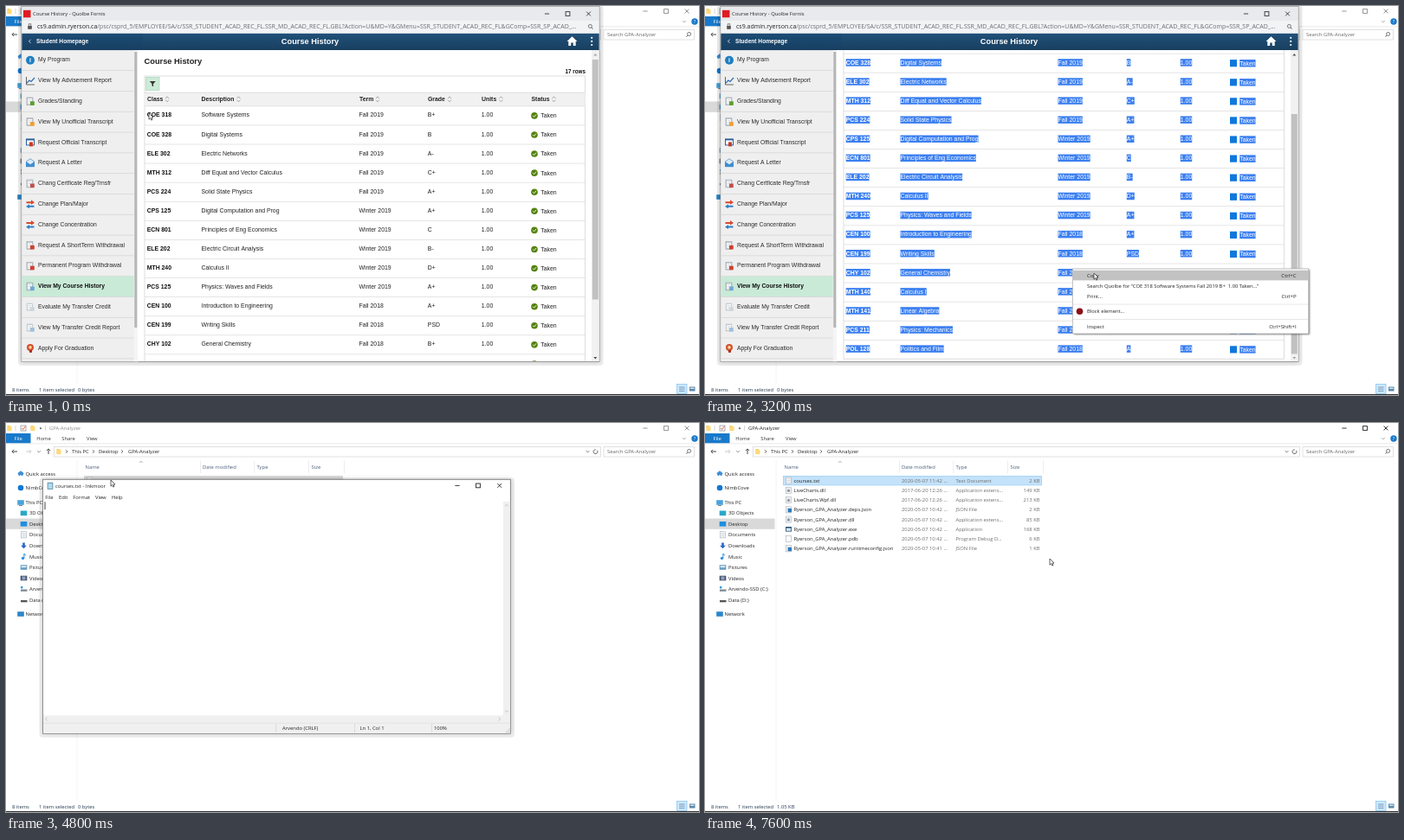
Write an HTML page with a canvas that moves like this. It is 800 px wide and 450 px high and loops after 7700 ms.

```html
<!DOCTYPE html>
<html lang="en">
<head>
<meta charset="utf-8">
<title>Course History</title>
<style>
html, body { margin: 0; width: 100%; height: 100%; overflow: hidden; background: #fff; }
canvas { display: block; width: 800px; height: 450px; }
</style>
</head>
<body>
<canvas id="stage"></canvas>
<script>
const LOOP = 7700, STEP = 100;
const canvas = document.getElementById('stage');
const c = canvas.getContext('2d');
const dpr = window.devicePixelRatio || 1;
canvas.width = 800 * dpr;
canvas.height = 450 * dpr;

const UI = '"Open Sans", "Noto Sans", sans-serif';
const ARIAL = '"Liberation Sans", Arial, sans-serif';
const MONO = '"Noto Sans Mono", monospace';

// --- drawing helpers ---
function text(s, x, y, size, color, family, align = 'left', weight = 400) {
  c.font = `${weight} ${size}px ${family}`;
  c.fillStyle = color;
  c.textAlign = align;
  c.fillText(s, x, y + size * 0.36);
}
const ui = (s, x, y, color = '#222', align = 'left', size = 5.85) => text(s, x, y, size, color, UI, align);
const arial = (s, x, y, color = '#222', weight = 400, size = 6.9, align = 'left') =>
  text(s, x, y, size, color, ARIAL, align, weight);

function rect(x, y, w, h, color) {
  c.fillStyle = color;
  c.fillRect(x, y, w, h);
}
function frame(x, y, w, h, color, lw = 1) {
  c.strokeStyle = color;
  c.lineWidth = lw;
  c.strokeRect(x, y, w, h);
}
function disc(x, y, r, color) {
  c.fillStyle = color;
  c.beginPath();
  c.arc(x, y, r, 0, 7);
  c.fill();
}
function path(points, color, lw = 0.8, fill) {
  c.beginPath();
  for (let i = 0; i < points.length; i += 2) c.lineTo(points[i], points[i + 1]);
  if (fill) {
    c.closePath();
    c.fillStyle = fill;
    c.fill();
  }
  if (color) {
    c.strokeStyle = color;
    c.lineWidth = lw;
    c.stroke();
  }
}
function chevron(x, y, dir, color = '#555', r = 1.8) {
  const [dx, dy] = { r: [1, 0], l: [-1, 0], u: [0, -1], d: [0, 1] }[dir];
  path([x - dx * r / 2 + dy * r, y - dy * r / 2 + dx * r, x + dx * r / 2, y + dy * r / 2,
    x - dx * r / 2 - dy * r, y - dy * r / 2 - dx * r], color, 0.8);
}
function shadowed(x, y, w, h, fill, blur, offset, alpha) {
  c.save();
  c.shadowColor = `rgba(0,0,0,${alpha})`;
  c.shadowBlur = blur * dpr;
  c.shadowOffsetX = c.shadowOffsetY = offset * dpr;
  rect(x, y, w, h, fill);
  c.restore();
}
function windowPanel(x, y, w, h, border) {
  c.fillStyle = 'rgba(0,0,0,.07)';
  c.beginPath();
  c.roundRect(x - 4, y - 2, w + 8.5, h + 6.5, 4);
  c.fill();
  shadowed(x, y, w, h, '#fff', 5, 0, 0.22);
  frame(x, y, w, h, border, 0.8);
}
function menuPanel(x, y, w, h, fill) {
  shadowed(x, y, w, h, fill, 2, 1.2, 0.5);
  frame(x, y, w, h, '#a8a8a8', 0.7);
}
function controls(xs, y, color, closeColor = color) {
  path([xs[0] - 2.6, y, xs[0] + 2.6, y], color, 0.9);
  frame(xs[1] - 2.4, y - 2.4, 4.8, 4.8, color, 0.9);
  path([xs[2] - 2.4, y - 2.4, xs[2] + 2.4, y + 2.4], closeColor, 0.9);
  path([xs[2] + 2.4, y - 2.4, xs[2] - 2.4, y + 2.4], closeColor, 0.9);
}
function folder(x, y) {
  rect(x - 2.5, y - 3, 3, 6, '#f3c34f');
  rect(x - 2, y - 2.2, 4.5, 5.4, '#ffd978');
}
function sheet(x, y, badge, lines = '#9aa7b4') {
  rect(x - 3, y - 3.6, 6, 7.2, '#fff');
  frame(x - 3, y - 3.6, 6, 7.2, '#a3acb5', 0.6);
  for (let i = 0; i < 3; i++) path([x - 2, y - 1.8 + i * 1.8, x + 2, y - 1.8 + i * 1.8], lines, 0.5);
  if (badge) rect(x, y + 0.4, 3.8, 3.4, badge);
}
function lens(x, y, side = 1) {
  c.strokeStyle = '#555';
  c.lineWidth = 0.8;
  c.beginPath();
  c.arc(x + 0.6 * side, y - 0.6, 2, 0, 7);
  c.stroke();
  path([x - 0.9 * side, y + 0.9, x - 2.6 * side, y + 2.6], '#555', 0.9);
}

// --- timing ---
const smooth = p => p * p * (3 - 2 * p);
const span = (t, a, b) => smooth(Math.min(1, Math.max(0, (t - a) / (b - a))));
const POINTER = [
  [0, 165, 124], [200, 165, 126], [900, 614, 390], [1100, 633, 400], [1600, 632, 397],
  [2200, 424, 304], [2400, 424, 304], [2500, 431, 309], [2600, 431, 309], [2800, 449, 309],
  [3200, 449, 309], [3600, 733, 249], [3700, 733, 249], [4200, 125, 76], [4500, 121, 66],
  [4800, 121, 66], [5100, 160, 153], [5200, 160, 153], [5500, 190, 192], [5700, 190, 192],
  [6500, 546, 75], [6700, 564, 69], [7100, 564, 69], [7600, 398, 157]
];
function pointerAt(t) {
  for (let i = 1; i < POINTER.length; i++) {
    const [a, x, y] = POINTER[i - 1], [b, u, v] = POINTER[i];
    if (t <= b) {
      const p = span(t, a, b);
      return [x + (u - x) * p, y + (v - y) * p];
    }
  }
  return POINTER[POINTER.length - 1].slice(1);
}
function pointer(x, y) {
  path([x, y, x, y + 7.2, x + 1.7, y + 5.7, x + 2.8, y + 8.1, x + 4, y + 7.5, x + 2.9, y + 5.2, x + 5, y + 5, x, y],
    '#222', 0.7, '#fff');
}

// --- file manager ---
const PLACES = [
  ['Quick access', 58.5, '#3d8fd8', 0], ['NimbCove', 75, '#0f78d4', 0], ['This PC', 92, '#4aa3dc', 0],
  ['3D Objects', 104.3, '#2aa7c9', 1], ['Desktop', 116.8, '#1f8fe0', 1], ['Documents', 129.3, '#8fa3b5', 1],
  ['Downloads', 141.8, '#2a66c8', 1], ['Music', 154.4, '#2f8fe0', 1], ['Pictures', 167, '#6a9cc0', 1],
  ['Videos', 179.5, '#4b5563', 1], ['Arvendo-SSD (C:)', 192, '#7d8a96', 1], ['Data (D:)', 204.5, '#555', 1],
  ['Network', 221, '#2d86c9', 0]
];
const DLL = 'Application extens...';
const FILES = [
  ['courses.txt', '', 'Text Document', ''],
  ['LiveCharts.dll', '2017-06-20 12:26 ...', DLL, '149 KB'],
  ['LiveCharts.Wpf.dll', '2017-06-20 12:26 ...', DLL, '213 KB'],
  ['Ryerson_GPA_Analyzer.deps.json', '2020-05-07 10:42 ...', 'JSON File', '2 KB'],
  ['Ryerson_GPA_Analyzer.dll', '2020-05-07 10:42 ...', DLL, '85 KB'],
  ['Ryerson_GPA_Analyzer.exe', '2020-05-07 10:42 ...', 'Application', '168 KB'],
  ['Ryerson_GPA_Analyzer.pdb', '2020-05-07 10:42 ...', 'Program Debug D...', '6 KB'],
  ['Ryerson_GPA_Analyzer.runtimeconfig.json', '2020-05-07 10:41 ...', 'JSON File', '1 KB']
];

function placeIcon(i, x, y, color) {
  if (i === 1) return disc(x, y, 3.3, color);
  if (i === 0) return path([x - 3.5, y - 0.5, x, y - 3.2, x + 3.5, y - 0.5, x + 2, y + 3, x, y + 1.5, x - 2, y + 3], null, 0, color);
  if (i === 5) return sheet(x, y);
  if (i === 6) return path([x - 1.3, y - 3.4, x + 1.3, y - 3.4, x + 1.3, y, x + 3.4, y, x, y + 3.5, x - 3.4, y, x - 1.3, y], null, 0, color);
  if (i === 7) {
    disc(x - 1, y + 2, 1.7, color);
    return path([x + 0.4, y + 2, x + 0.4, y - 3.4, x + 2.4, y - 1], color, 1);
  }
  if (i === 10 || i === 11) {
    if (i === 10) rect(x - 3.5, y - 3, 2.4, 2.4, '#2a9be0');
    return rect(x - 3.5, y + 0.5, 7.5, 2.3, color);
  }
  rect(x - 3.8, y - 2.8, 7.6, 5.6, color);
  if (i === 2) rect(x - 2, y + 3, 4, 0.8, '#666');
  if (i === 8) rect(x - 2.8, y - 1.8, 5.6, 2, '#d8ecf8');
  if (i === 9) rect(x - 2, y - 2, 4, 4, '#8aa0c8');
}

function fileIcon(i, x, y) {
  if (i === 5) {
    rect(x - 3.4, y - 2.8, 6.8, 5.6, '#27506f');
    return rect(x - 2.6, y - 1.2, 5.2, 3.2, '#d7e9f5');
  }
  sheet(x, y, null, i === 6 ? '#fff' : '#9aa7b4');
  if (i === 3 || i === 7) rect(x - 0.8, y - 1.4, 4.4, 4.4, '#2b7cc0');
  if (i === 1 || i === 2 || i === 4) disc(x, y + 0.4, 1.6, '#8b98a5');
}

function explorer(t, mx, my) {
  const active = (t >= 3800 && t < 4800) || t >= 7200;
  const picked = t < 3800 || t >= 4600;
  const saved = t >= 7200;
  const ink = active ? '#222' : '#8a8a8a';
  rect(0, 0, 800, 450, '#fff');

  folder(4, 6);
  path([11, 3, 11, 9], '#bbb', 0.6);
  frame(17, 3, 6, 6, '#888', 0.7);
  path([18.2, 6, 19.6, 7.6, 22.4, 3.8], '#d2562b', 0.9);
  folder(31, 6);
  path([38.7, 5.6, 41.3, 5.6, 40, 7.4], null, 0, '#333');
  path([45.5, 3, 45.5, 9], '#bbb', 0.6);
  ui('GPA-Analyzer', 50, 6, ink);
  controls([738, 762, 786], 6, ink);

  rect(0, 12, 28.5, 11.5, '#1979ca');
  ui('File', 14.2, 18, '#fff', 'center');
  ui('Home', 43.5, 18, '#333', 'center');
  ui('Share', 72, 18, '#333', 'center');
  ui('View', 99.3, 18, '#333', 'center');
  chevron(783, 18, 'd', '#999');
  disc(795, 18, 3.7, '#1979ca');
  ui('?', 795, 18, '#fff', 'center', 5.5);
  rect(0, 23.5, 800, 0.7, '#e2e2e2');

  path([13, 33, 7, 33], '#333', 0.9);
  chevron(8, 33, 'l', '#333', 2.2);
  path([23, 33, 29, 33], '#c4c4c4', 0.9);
  chevron(28, 33, 'r', '#c4c4c4', 2.2);
  chevron(38, 33, 'd', '#777');
  path([49, 36, 49, 30], '#333', 0.9);
  chevron(49, 31, 'u', '#333', 2.2);
  frame(55.5, 27.5, 631, 11.5, '#d9d9d9', 0.8);
  folder(61, 33);
  [70, 101, 134].forEach(x => chevron(x, 33, 'r', '#444'));
  ui('This PC', 76, 33);
  ui('Desktop', 107, 33);
  ui('GPA-Analyzer', 141, 33);
  chevron(671.5, 33, 'd');
  c.beginPath();
  c.arc(680.5, 33.2, 2.4, -0.6, 4.8);
  c.strokeStyle = '#444';
  c.lineWidth = 0.8;
  c.stroke();
  frame(690, 27.5, 104.5, 11.5, '#d9d9d9', 0.8);
  ui('Search GPA-Analyzer', 694, 33, '#666');
  lens(788, 33);

  rect(0, 110.5, 80.5, 12.3, '#d9d9d9');
  PLACES.forEach(([label, y, color, sub], i) => {
    placeIcon(i, sub ? 20.5 : 17, y, color);
    ui(label, sub ? 27 : 22.5, y);
  });
  rect(81.7, 43, 0.7, 394, '#ededed');

  chevron(156, 45, 'u', '#888', 1.6);
  [['Name', 91.5], ['Date modified', 227], ['Type', 289.5], ['Size', 352.5]].forEach(([s, x]) => ui(s, x, 50.7, '#4c607a'));
  [224, 286.5, 349.3, 390].forEach(x => rect(x, 43.5, 0.7, 14.5, '#e5e5e5'));

  FILES.forEach((file, i) => {
    const y = 66.6 + i * 11.24, top = y - 5.6;
    const hover = active && mx > 90 && mx < 389 && my >= top && my < top + 11.24;
    if (i === 0 && picked) {
      rect(90, top, 299, 11.2, active ? '#c4e2fa' : '#d9d9d9');
      if (active) frame(90.3, top + 0.3, 298.4, 10.6, '#9ad0f7', 0.6);
    } else if (hover) {
      rect(90, top, 299, 11.2, '#e1f4fb');
    }
    if (i === 0 && !picked) frame(90.3, top + 0.3, 298.4, 10.6, '#cfeaf6', 0.6);
    fileIcon(i, 96.5, y);
    const date = file[1] || `2020-05-07 11:${saved ? 42 : 41} ...`;
    ui(file[0], 102.5, y);
    ui(date, 227, y, '#6d6d6d');
    ui(file[2], 289.5, y, '#6d6d6d');
    ui(file[3] || (saved ? '2 KB' : '0 KB'), 386.5, y, '#6d6d6d', 'right');
  });

  ui('8 items', 7, 443.5, '#24384f');
  if (picked) {
    ui('1 item selected', 38, 443.5, '#24384f');
    ui(saved ? '1.05 KB' : '0 bytes', 83, 443.5, '#24384f');
  }
  rect(774.5, 437.5, 11.5, 11, '#cce8ff');
  frame(774.5, 437.5, 11.5, 11, '#7fc1ee', 0.7);
  for (let i = 0; i < 3; i++) path([777, 441 + i * 2.2, 783.5, 441 + i * 2.2], '#5a7a94', 0.7);
  rect(789, 440.5, 6.5, 5, '#5b87a8');
  rect(790, 441.5, 4.5, 1.5, '#cfe6f5');
  rect(0, 449, 800, 1, '#333');
}

// --- browser ---
const MENU = ['My Program', 'View My Advisement Report', 'Grades/Standing', 'View My Unofficial Transcript',
  'Request Official Transcript', 'Request A Letter', 'Chang Certficate Reg/Trnsfr', 'Change Plan/Major',
  'Change Concentration', 'Request A ShortTerm Withdrawal', 'Permanent Program Withdrawal',
  'View My Course History', 'Evaluate My Transfer Credit', 'View My Transfer Credit Report', 'Apply For Graduation'];
const BADGES = { 2: '#5aa02c', 3: '#f0a030', 6: '#c0504d', 9: '#d0402b', 10: '#d0402b', 11: '#6fa8d6', 12: '#cfd6dc', 13: '#9fc0dc' };
const COURSES = `COE 318|Software Systems|B+
COE 328|Digital Systems|B
ELE 302|Electric Networks|A-
MTH 312|Diff Equat and Vector Calculus|C+
PCS 224|Solid State Physics|A+
CPS 125|Digital Computation and Prog|A+
ECN 801|Principles of Eng Economics|C
ELE 202|Electric Circuit Analysis|B-
MTH 240|Calculus II|D+
PCS 125|Physics: Waves and Fields|A+
CEN 100|Introduction to Engineering|A+
CEN 199|Writing Skills|PSD
CHY 102|General Chemistry|B+
MTH 140|Calculus I|C+
MTH 141|Linear Algebra|B
PCS 211|Physics: Mechanics|A
POL 128|Politics and Film|A`.split('\n').map((line, i) => {
  const [code, name, grade] = line.split('|');
  return { code, name, grade, term: i < 5 ? 'Fall 2019' : i < 10 ? 'Winter 2019' : 'Fall 2018' };
});

function menuIcon(i, x, y) {
  if (i === 0) {
    disc(x, y, 5, '#1f7fc0');
    return arial('i', x, y, '#fff', 700, 7, 'center');
  }
  if (i === 1) {
    path([x - 4.5, y - 4.5, x - 4.5, y + 4.5, x + 5, y + 4.5], '#555', 0.9);
    return path([x - 4, y + 2.5, x - 1, y - 0.5, x + 1, y + 1, x + 5, y - 3.5], '#2c6fb5', 1.2);
  }
  if (i === 4) {
    rect(x - 5, y - 4.5, 10, 8, '#2d5f9a');
    rect(x - 4, y - 2.5, 8, 5, '#fff');
    return rect(x - 1, y - 0.5, 4, 5, '#c8392b');
  }
  if (i === 5) {
    rect(x - 5, y - 1.5, 10, 6, '#3f8fd0');
    return path([x - 5, y - 1.5, x, y - 5, x + 5, y - 1.5, x, y + 2], '#2f74b0', 0.6, '#dcecf8');
  }
  if (i === 7 || i === 8) {
    path([x - 4.5, y - 3, x + 1, y - 3, x + 1, y - 5, x + 5, y - 2, x + 1, y + 0.5, x + 1, y - 1, x - 4.5, y - 1], null, 0, '#d9482f');
    return path([x + 4.5, y + 1.5, x - 1, y + 1.5, x - 1, y, x - 5, y + 2.6, x - 1, y + 5, x - 1, y + 3.5, x + 4.5, y + 3.5], null, 0, '#2f7fc4');
  }
  if (i === 14) {
    disc(x, y - 1, 4, '#d4502c');
    disc(x, y - 1, 1.8, '#f7d9a0');
    return rect(x - 1, y + 2, 3, 3, '#a8321f');
  }
  sheet(x - 0.5, y, null, '#a8b4c0');
  frame(x - 4, y - 4.4, 7, 8.8, i > 11 ? '#d5dade' : '#94a0ab', 0.6);
  rect(x, y, 4.8, 4.6, BADGES[i]);
}

function cell(s, x, y, weight, selected) {
  if (selected) {
    c.font = `${weight} 6.9px ${ARIAL}`;
    rect(x, y - 4.1, c.measureText(s).width, 8.5, '#3b7ff0');
  }
  arial(s, x, y, selected ? '#fff' : weight > 400 ? '#111' : '#222', weight);
}

const SCROLL = 82.8;
function courseTable(t) {
  const off = SCROLL * span(t, 100, 700), selected = t >= 1300;
  c.save();
  c.beginPath();
  c.rect(152, 51, 524, 360);
  c.clip();
  rect(152, 51, 524, 360, '#fff');
  c.translate(0, -off);
  arial('Course History', 159.5, 63.3, '#222', 700, 9.3);
  arial('17 rows', 669, 76, '#111', 700, 6.3, 'right');
  frame(160, 81, 508.5, 410, '#d6d6d6', 0.8);
  rect(161.5, 82.5, 15.5, 15, '#cdebd8');
  frame(161.5, 82.5, 15.5, 15, '#a9d3ba', 0.7);
  path([165.8, 87, 172.8, 87, 170.1, 90, 170.1, 93.2, 168.5, 92.3, 168.5, 90], null, 0, '#333');
  rect(160, 99.8, 508.5, 16, '#f1f1f1');
  rect(160, 99.8, 508.5, 0.7, '#d6d6d6');
  [['Class', 163, 186], ['Description', 225.5, 268.5], ['Term', 408, 429], ['Grade', 487, 512],
    ['Units', 549, 571.5], ['Status', 606.5, 632.5]].forEach(([s, x, a]) => {
    arial(s, x, 107.8, '#222', 700);
    path([a - 2, 107, a, 104.8, a + 2, 107], '#777', 0.6);
    path([a - 2, 108.6, a, 110.8, a + 2, 108.6], '#777', 0.6);
  });
  COURSES.forEach((k, i) => {
    const y = 126 + i * 22.08;
    rect(160, y - 10.5, 508.5, 0.7, '#dadada');
    cell(k.code, 162.7, y, 700, selected);
    cell(k.name, 225.5, y, 400, selected);
    cell(k.term, 407.5, y, 400, selected);
    cell(k.grade, 486.8, y, 400, selected);
    cell('1.00', 548.8, y, 400, selected);
    cell('Taken', 617.2, y + 0.8, 400, selected);
    if (selected) {
      rect(606, y - 3.2, 8, 8.2, '#0f78dc');
    } else {
      disc(610, y + 0.9, 3.8, '#55830f');
      path([608.2, y + 0.9, 609.6, y + 2.3, 612, y - 0.5], '#fff', 0.9);
    }
  });
  c.restore();

  rect(676, 51, 8.7, 360, '#f1f1f1');
  rect(676.8, 62 + off * 63 / SCROLL, 7, 277.5, '#c1c1c1');
  path([678.3, 57.5, 682.3, 57.5, 680.3, 55], null, 0, off > 1 ? '#505050' : '#a3a3a3');
  path([678.3, 406, 682.3, 406, 680.3, 408.5], null, 0, off < 82 ? '#505050' : '#a3a3a3');
}

function pageMenu(t) {
  menuPanel(424.3, 304, 272.5, 75, '#fff');
  if (t >= 2500) rect(424.7, 305.8, 271.7, 11.6, '#c2c2c2');
  [['Copy', 311.6, 'Ctrl+C'], ['Search Quolbe for \u201cCOE 318 Software Systems Fall 2019 B+  1.00 Taken...\u201d', 323.7, ''],
    ['Print...', 336, 'Ctrl+P'], ['Block element...', 353.3, ''], ['Inspect', 371.2, 'Ctrl+Shift+I']].forEach(([s, y, key]) => {
    ui(s, 441, y);
    ui(key, 682.7, y, '#222', 'right', 6.1);
  });
  [344.7, 362.2].forEach(y => rect(425, y, 271, 0.7, '#dcdcdc'));
  disc(432.5, 353.2, 3.8, '#8c1016');
}

function browser(t) {
  windowPanel(18, 0.5, 667, 411, '#8b8b8b');
  rect(18.4, 0.8, 666.2, 16.4, '#e8eaed');
  rect(20, 4.8, 8.5, 8.5, '#e01b22');
  ui('Course History - Quolbe Fornis', 31, 9);
  controls([624.5, 648.5, 672.5], 9, '#333');
  rect(18.4, 17, 666.2, 15, '#f1f3f4');
  rect(25.2, 23, 4.6, 3.8, '#555');
  frame(26.2, 20.8, 2.6, 3, '#555', 0.7);
  const host = 'cs9.admin.ryerson.ca';
  ui(host, 36, 23.8, '#202124', 'left', 7);
  const w = c.measureText(host).width;
  ui('/psc/csprd_5/EMPLOYEE/SA/c/SSR_STUDENT_ACAD_REC_FL.SSR_MD_ACAD_REC_FL.GBL?Action=U&MD=Y&GMenu=SSR_STUDENT_ACAD_REC_FL&GComp=SSR_SP_ACAD_...',
    36 + w, 23.8, '#6a6e73', 'left', 7);
  lens(675, 24, -1);

  const g = c.createLinearGradient(0, 32, 0, 51);
  g.addColorStop(0, '#215078');
  g.addColorStop(1, '#183f5f');
  rect(18.4, 31.8, 666.2, 19.5, g);
  rect(18.4, 31.8, 139.6, 19.5, 'rgba(16,60,105,.2)');
  chevron(27.5, 40.8, 'l', '#fff', 2);
  arial('Student Homepage', 35, 40.8, '#fff', 700, 6.6);
  arial('Course History', 351, 40.6, '#fff', 700, 9.25, 'center');
  path([647.5, 41, 653.5, 35.2, 659.5, 41, 657.7, 41, 657.7, 46, 654.8, 46, 654.8, 42.5, 652.2, 42.5, 652.2, 46, 649.3, 46, 649.3, 41], null, 0, '#fff');
  [36.8, 40.9, 45].forEach(y => disc(676.2, y, 1.1, '#fff'));

  rect(18.4, 51.3, 133.6, 359.9, '#efefef');
  MENU.forEach((s, i) => {
    const y = 62 + i * 23.8, on = i === 11;
    if (on) rect(18.4, y - 11.2, 129.4, 23.8, '#c9ead7');
    rect(18.4, y + 12.3, 129.4, 0.7, '#d3d3d3');
    menuIcon(i, 28, y + 0.7);
    arial(s, 37, y, on ? '#111' : '#2b2b2b', on ? 700 : 400, 6.78);
  });
  rect(147.8, 51.3, 4.2, 359.9, '#f5f5f5');
  rect(148.3, 53, 3, 319, '#b5b5b5');
  rect(152, 51.3, 0.6, 359.9, '#d0d0d0');
  courseTable(t);
  if (t >= 2400 && t < 3300) pageMenu(t);
}

// --- text editor ---
const PASTED = COURSES.flatMap(k => [k.code, k.name, k.term, k.grade, '1.00', 'TakenTaken']).slice(-26);
const EDIT_MENU = [['Undo', 159.7], ['Cut', 172.6], ['Copy', 182.6], ['Paste', 192.6, 1], ['Delete', 202.6], ['Select All', 215.5],
  ['Right to left Reading order', 228.5, 1], ['Show Unicode control characters', 238.5, 1],
  ['Insert Unicode control character', 248.5, 1], ['Open IME', 261.4, 1], ['Reconversion', 271.4], ['Search with Vufo...', 284.4, 1]];

function editMenu(mx, my) {
  menuPanel(159, 153.3, 129.3, 137, '#eeeeee');
  EDIT_MENU.forEach(([s, y, on]) => {
    if (on && my > y - 5 && my <= y + 5 && mx > 164) rect(160, y - 5, 127.5, 10, '#9bbff3');
    ui(s, 173.7, y, on ? '#222' : '#8a8a8a', 'left', 5.92);
  });
  chevron(282.3, 248, 'r', '#555', 1.4);
  [166, 209, 222, 254.8, 277.8].forEach(y => rect(162, y - 0.3, 125, 0.7, '#cfcfcf'));
}

function editor(t, mx, my) {
  const pasted = t >= 5800, closing = t >= 6600;
  windowPanel(42.5, 65.3, 540, 294, '#777');
  rect(48, 69, 6, 7.4, '#8fc4dd');
  frame(48, 69, 6, 7.4, '#5b7f92', 0.6);
  for (let i = 0; i < 3; i++) path([49, 71.3 + i * 1.7, 53, 71.3 + i * 1.7], '#fff', 0.6);
  ui('courses.txt - Inkmoor', 57, 72.5);
  if (closing) rect(558, 65.3, 24.3, 14.6, '#e81123');
  controls([521, 545, 569.7], 72.4, '#222', closing ? '#fff' : '#222');
  [['File', 45.3], ['Edit', 61], ['Format', 77.3], ['View', 103], ['Help', 122]].forEach(([s, x]) => ui(s, x, 86));

  if (pasted) PASTED.forEach((s, i) => text(s, 44.5, 95.7 + i * 9.16, 6.95, '#1a1a1a', MONO));
  else rect(44.6, 91.2, 0.8, 8.8, '#111');

  rect(574, 91, 8.1, 247.5, '#f0f0f0');
  rect(43, 338.3, 539.1, 8.7, '#f0f0f0');
  if (pasted) rect(574, 271, 8.1, 58, '#cdcdcd');
  const arrow = pasted ? '#555' : '#b5b5b5';
  chevron(578, 95.3, 'u', arrow);
  chevron(578, 333.5, 'd', arrow);
  chevron(46.6, 342.5, 'l', '#b5b5b5');
  chevron(569.5, 342.5, 'r', '#b5b5b5');

  rect(43, 347, 539.1, 12, '#f0f0f0');
  rect(43, 346.8, 539.1, 0.6, '#d9d9d9');
  [311.5, 402, 491].forEach(x => rect(x, 348, 0.7, 10, '#d0d0d0'));
  ui('Arvendo (CRLF)', 319, 353.2);
  ui(pasted ? 'Ln 87, Col 10' : 'Ln 1, Col 1', 408.5, 353.2);
  ui('100%', 494, 353.2);
  for (let i = 0; i < 3; i++) for (let j = 0; j <= i; j++) rect(580.4 - j * 1.8, 353.6 + i * 1.8, 0.9, 0.9, '#aaa');

  if (t >= 5200 && !pasted) editMenu(mx, my);
}

function draw(t) {
  c.setTransform(dpr, 0, 0, dpr, 0, 0);
  const [mx, my] = pointerAt(t);
  explorer(t, mx, my);
  if (t < 3800) browser(t);
  if (t >= 4800 && t < 7200) editor(t, mx, my);
  pointer(mx, my);
}

const start = performance.now();
let shown = -1;
function tick() {
  const t = Math.floor(((performance.now() - start) % LOOP) / STEP) * STEP;
  if (t !== shown) draw(shown = t);
  requestAnimationFrame(tick);
}
tick();
</script>
</body>
</html>
```
